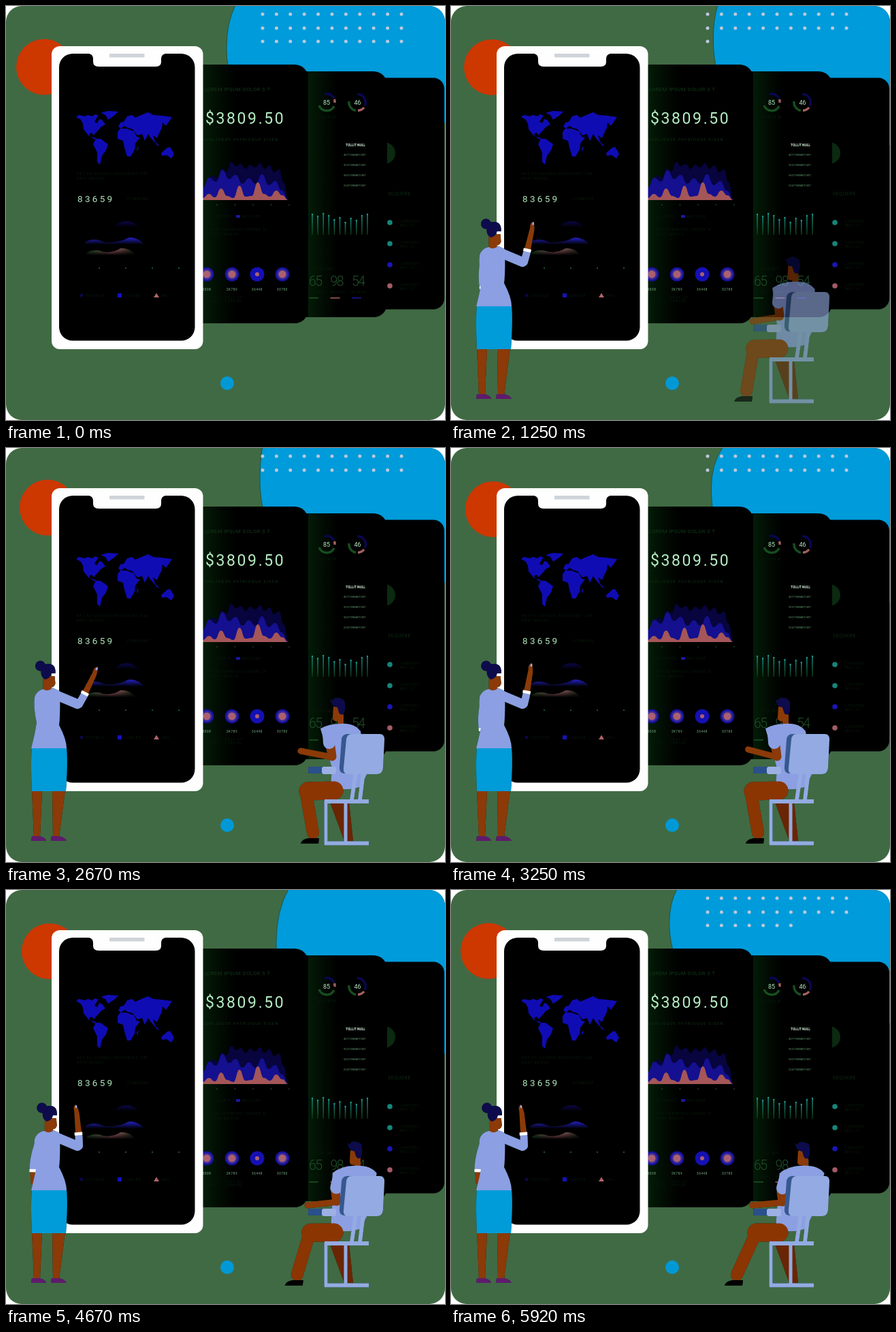
Write an HTML page that moves like this. It is 645 px wide and 608 px high and loops after 6.01 s.

```html
<!DOCTYPE html>
<html lang="en">
<head>
<meta charset="utf-8">
<title>Dashboard team</title>
<style>
  html, body { margin: 0; width: 100%; height: 100%; overflow: hidden; background: #fff; }
  svg { display: block; font-family: Roboto, "Open Sans", sans-serif; }
  .dim { fill: #081c0b; font-size: 5px; letter-spacing: 1px; }
  .map { fill: #100cb4; }
  .skin { fill: #8b3a08; }
  .skinLine { stroke: #8b3a08; }
  .cloth { fill: #8b9fe2; }
  .clothLine { stroke: #8b9fe2; }
  .hair { fill: #0d0b4c; }
  .limb { fill: none; stroke-linecap: round; stroke-linejoin: round; }
  .chair { fill: none; stroke: #93abe2; }
  #woman, #man { filter: drop-shadow(0 0 .6px #0a2a10); }
</style>
</head>
<body>
<svg width="645" height="608" viewBox="0 0 645 608">
  <defs>
    <clipPath id="stage"><rect width="645" height="608" rx="23"/></clipPath>
    <clipPath id="side"><rect x="560" y="106" width="84" height="340"/></clipPath>
    <linearGradient id="bar" x1="0" x2="0" y1="0" y2="1">
      <stop offset="0" stop-color="#178b80"/><stop offset="1" stop-color="#0b3414"/>
    </linearGradient>
    <linearGradient id="wave" x1="0" x2="0" y1="0" y2="1">
      <stop offset="0" stop-color="#2220c0"/><stop offset=".75" stop-color="#000"/>
    </linearGradient>
    <linearGradient id="arch" x1="0" x2="0" y1="0" y2="1">
      <stop offset="0" stop-color="#0a0748"/><stop offset="1" stop-color="#000"/>
    </linearGradient>
    <linearGradient id="wave2">
      <stop offset="0" stop-color="#1c5424"/><stop offset=".5" stop-color="#b06470"/><stop offset="1" stop-color="#0b2410"/>
    </linearGradient>
    <linearGradient id="fade" x1="0" x2="0" y1="0" y2="1">
      <stop offset="0" stop-color="#000" stop-opacity="0"/><stop offset="1" stop-color="#000"/>
    </linearGradient>
    <linearGradient id="shade">
      <stop offset="0" stop-color="#031c07"/><stop offset=".5" stop-color="#020c03"/><stop offset="1" stop-color="#000"/>
    </linearGradient>
  </defs>

  <g clip-path="url(#stage)">
    <rect width="645" height="608" fill="#406a44"/>
    <path id="blob" fill="#009bda" stroke="#1d4423" stroke-width=".7"/>
    <g id="dots" fill="#bcc8dc"></g>
    <circle id="sun" r="41" fill="#cd3700"/>

    <g id="panel4">
      <rect x="500" y="105.500" width="144" height="340" rx="16"/>
      <circle cx="556" cy="216" r="16" fill="#0b2a10" clip-path="url(#side)"/>
      <text x="561" y="278" fill="#0e2a12" font-size="7" letter-spacing=".6">SEQUERE</text>
    </g>

    <g id="panel3">
      <rect x="400" y="96" width="160" height="361" rx="20"/>
      <rect x="444" y="96" width="44" height="361" fill="url(#shade)"/>
      <g fill="none" stroke-width="3.500">
        <path d="M468 129.500A12 12 0 0 1 482 136" stroke="#0a0750"/>
        <path d="M482.500 137A12 12 0 0 1 483 142" stroke="#a4605f"/>
        <path d="M482 147A12 12 0 0 1 460 146" stroke="#174d1f"/>
        <path d="M516 129.500A12 12 0 0 1 527 147" stroke="#0a0750"/>
        <path d="M526 149A12 12 0 0 1 517 153.500" stroke="#a4605f"/>
        <path d="M514 153.500A12 12 0 0 1 504 140" stroke="#174d1f"/>
      </g>
      <g fill="#b9ebc4" font-size="9" text-anchor="middle">
        <text x="471" y="144.500">85</text><text x="516.500" y="144.500">46</text>
      </g>
      <text x="456" y="165" class="dim">ASSUM M</text>
      <text x="528" y="206" fill="#d9f5de" font-size="4.900" font-weight="700" text-anchor="end">TOLLIT NULL</text>
    </g>

    <g id="panel2">
      <rect x="240" y="86" width="204" height="380" rx="20"/>
      <rect x="289" y="86" width="48" height="380" fill="url(#shade)"/>
      <text x="291" y="125" fill="#123a18" font-size="7.500" letter-spacing=".5">LOREM IPSUM DOLOR S T</text>
      <text x="293" y="173" fill="#b5edc2" font-size="23" letter-spacing="2.600">$3809.50</text>
      <text x="289" y="198" fill="#123516" font-size="5.500" letter-spacing="1.450">QUALISQUE PATRIOQUE SISEN</text>
      <rect x="338" y="307" width="6" height="4" fill="#1a17a0"/>
      <text x="292" y="311" class="dim">ASSUEVERIT</text><text x="347" y="311" class="dim">MELIORE</text>
      <text x="289" y="330" class="dim">UT NAM COMMODO LABORE SI</text>
      <text x="289" y="337" class="dim">VIS ERAT MODUS</text>
    </g>

    <g id="phone">
      <rect x="67" y="59" width="222.500" height="445" rx="12" fill="#fdfefd"/>
      <rect x="78" y="70" width="199.500" height="421.500" rx="20"/>
      <path d="M122 70H234Q228 71 228 78V82Q228 89 220 89H136Q128 89 128 82V78Q128 71 122 70Z" fill="#fdfefd"/>
      <rect x="152" y="70" width="51.500" height="5.500" rx="1" fill="#cfd4da"/>
      <path class="map" d="M103 163L107 160 116 162 120 160 127 162 131 159 136 161 133 165 130 170 134 172 137 166 141 167 146 174 139 178 136 182 131 187 129 190 126 186 122 188 124 192 130 193 135 197 129 195 121 190 114 181 113 173 110 167Z"/>
      <path class="map" d="M139 157L150 154 165 155 159 161 150 167 146 160Z"/>
      <path class="map" d="M132 195L139 195 150 203 147 212 141 220 138 233 134 229 134 215 128 203Z"/>
      <path class="map" d="M164 185L168 180 177 180 188 184 192 192 197 193 190 202 189 211 183 221 178 221 174 208 172 198 164 195Z"/>
      <path class="map" d="M165 177L168 171 173 170 178 162 185 160 190 164 199 160 209 156 216 160 228 161 244 163 240 169 235 176 230 171 229 179 225 187 222 194 216 190 220 202 212 193 209 188 204 198 200 188 193 190 186 181 179 179 174 176 169 180Z"/>
      <path class="map" d="M228 216L237 208 241 207 247 217 243 224 236 219 229 220ZM219 199L226 206 221 204ZM192 209L195 206 193 214Z"/>
      <text x="104" y="248" class="dim">NEC EA QUANDO PRODESSET VIM</text>
      <text x="104" y="255" class="dim">ERAT MODUS</text>
      <text x="105" y="288" fill="#b0e6bb" font-size="13.500" letter-spacing="3.300">83659</text>
      <text x="178" y="285" class="dim">COMMUNE</text>
      <path d="M158 325Q166 316 177 316T196 325Z" fill="url(#arch)"/>
      <path d="M116 347Q128 339 145 347Q168 347 178 341Q190 337 205 351Q180 356 160 352Q138 356 116 351Z" fill="url(#wave)"/>
      <path d="M119 362Q130 356 143 361Q158 363 168 356Q180 354 191 366Q150 369 119 365Z" fill="url(#wave2)"/>
      <rect x="117" y="356" width="80" height="10" fill="url(#fade)"/>
      <rect x="117" y="366" width="80" height="4"/>
      <circle cx="111" cy="425" r="2.500" fill="#0a0748"/>
      <rect x="164" y="422" width="6" height="6" fill="#1411c0"/>
      <path d="M221 421.500L225 428H217Z" fill="#b06468"/>
      <text x="117" y="427" class="dim">VOCIBUS</text><text x="174" y="427" class="dim">LABORE</text><text x="229" y="427" class="dim">MEI</text>
    </g>
    <circle cx="325" cy="554" r="10" fill="#0099d6"/>

    <g id="woman">
      <g id="restArm" class="limb">
        <path d="M51 366Q42 385 41.500 408" class="clothLine" stroke-width="11"/>
        <path d="M41 417L42 429" class="skinLine" stroke-width="7"/>
        <path d="M36 412.500H47" stroke="#fff" stroke-width="4.500" stroke-linecap="butt"/>
      </g>
      <path class="skin" d="M38 502H53L50 572H41ZM68 502H87L78 572H69Z"/>
      <path fill="#5f1b6e" d="M38 570H49Q58 572 59 577H37ZM67 570H78Q87 572 89 577H66Z"/>
      <path fill="#009bd9" d="M38 440H89Q91 460 88 504H38Q36 460 38 440Z"/>
      <path class="cloth" d="M55 354Q45 356 42 366Q40 382 45 403Q43 418 37 441H89Q89 428 78 407Q80 390 79 357L68 352Z"/>
      <g id="head">
        <path class="skin" d="M55 335H72L73 346Q71 352 67 351V354Q60 358 55 354Z"/>
        <path class="hair" d="M52 326Q54 316 64 317Q74 318 73 331H67Q66 338 58 340Q51 336 52 326Z"/>
        <circle class="hair" cx="51" cy="320" r="7.500"/>
      </g>
      <path class="limb clothLine" d="M74 363L105 376" stroke-width="14"/>
      <g id="foreArm" class="limb">
        <path d="M107.500 376L108 362" class="clothLine" stroke-width="11"/>
        <path class="skin" d="M103.500 357L104 325Q102 317 107 315Q110 320 111 328L112.500 357Z"/>
        <path d="M102 358H113.500" stroke="#fff" stroke-width="4.500" stroke-linecap="butt"/>
        <path d="M107 317V319" stroke="#9cabe6" stroke-width="2.500"/>
      </g>
    </g>

    <g id="man">
      <path fill="#6a2604" d="M476 520H504L510 577H497Z"/>
      <g id="manHead">
        <path class="skin" d="M481 380H496V407Q490 411 487 404V401Q481 402 480 397Z"/>
        <path class="hair" d="M477 369Q481 373 482 368Q490 365 497 371Q500 382 496 391Q491 393 489 388L487 381Q479 381 477 369Z"/>
      </g>
      <path id="torso" class="cloth"/>
      <path id="shin" class="limb" stroke="#8b3503" stroke-width="18"/>
      <path id="thigh" class="limb" stroke="#8b3503" stroke-width="27"/>
      <path id="shoe" d="M433 581Q435 574 445 573H460L459 581Z"/>
      <rect x="444" y="468" width="22" height="10" rx="3" fill="#2a4f8a"/>
      <rect x="464" y="468" width="21" height="11" rx="3" fill="#9db0e4"/>
      <path id="upperArm" class="limb skinLine" stroke-width="13"/>
      <path id="lowerArm" class="limb skinLine" stroke-width="9"/>
      <path id="sleeve" class="limb clothLine" stroke-width="18"/>
      <path class="chair" stroke-width="6" d="M514 476L508 517M525 476L520 517M468 519H533M468 580.500H533"/>
      <path class="chair" stroke-width="5" d="M470 518V582M499 518V580"/>
      <path fill="#36588f" d="M502 420H515V478H497Q489 477 490 468L493 428Q494 420 502 420Z"/>
      <path fill="#93abe2" d="M508 420H549Q556 420 556 428L554 470Q553 479 545 479H503Q495 479 496 470L500 428Q501 420 508 420Z"/>
    </g>
  </g>
</svg>
<script>
const $ = id => document.getElementById(id);
const NS = 'http://www.w3.org/2000/svg';

function add(parent, tag, attrs, text = '') {
  const node = document.createElementNS(NS, tag);
  for (const k in attrs) node.setAttribute(k, attrs[k]);
  node.textContent = text;
  return $(parent).appendChild(node);
}
const dot = (parent, cx, cy, r, fill) => add(parent, 'circle', { cx, cy, r, fill });

// Dot grid
const rows = [12, 32.5, 52].map(y => {
  const row = [];
  for (let i = 0; i < 11; i++) row.push(dot('dots', 377 + 20.4 * i, y, 2.5, '#bcc8dc'));
  return row;
});

// Area chart: heights at even spacing, joined by smooth slopes
function ridge(heights, fill) {
  const x0 = 289, dx = 126 / (heights.length - 1);
  let d = `M${x0} 285V${285 - heights[0]}`;
  for (let i = 1; i < heights.length; i++) {
    const x = x0 + dx * i, m = x - dx / 2;
    d += `C${m} ${285 - heights[i - 1]} ${m} ${285 - heights[i]} ${x} ${285 - heights[i]}`;
  }
  add('panel2', 'path', { d: d + 'V285Z', fill });
}
ridge([14, 25, 36, 33, 46, 42, 56, 50, 53, 46, 52, 48, 54, 46, 51, 41, 45, 26, 0], '#07043e');
ridge([18, 33, 27, 44, 31, 37, 24, 32, 24, 38, 22, 28, 14, 0], '#14108f');
ridge([3, 9, 4, 17, 6, 3, 21, 5, 6, 26, 9, 5, 14, 7, 0], '#a45658');

// Small repeated items on the screens
['#17857a', '#17857a', '#1a15b4', '#a45c66'].forEach((c, i) => {
  const y = 318 + 31 * i;
  dot('panel4', 564, y, 3.8, c);
  add('panel4', 'text', { x: 579, y, class: 'dim' }, 'LABORES');
  add('panel4', 'text', { x: 579, y: y + 6, class: 'dim' }, 'MEL UT');
});

['4077598METOKT', '9537598METOKT', '9437598METOKT', '2347598METOKT'].forEach((s, i) => {
  const y = 220 + 15 * i;
  add('panel3', 'text', { x: 529, y, fill: '#5e9469', 'font-size': 4.2, 'text-anchor': 'end' }, s);
  add('panel3', 'text', { x: 445, y, class: 'dim' }, 'EA');
});

[305, 308, 304, 307, 313, 310, 317, 311, 314, 307, 305].forEach((y, i) => {
  const x = 450 + 8.1 * i;
  add('panel3', 'rect', { x: x - 0.8, y, width: 1.6, height: 336 - y, fill: 'url(#bar)' });
  dot('panel3', x, y + 1, 1.2, '#199a90');
});

[['65', '#1c5424'], ['98', '#a4605f'], ['54', '#1a17a0']].forEach(([n, c], i) => {
  const x = 445 + 31.5 * i;
  add('panel3', 'text', { x, y: 411, fill: '#204f29', 'font-size': 19.5, 'font-weight': 300, 'letter-spacing': -1.6 }, n);
  add('panel3', 'text', { x, y: 422, class: 'dim' }, 'MODUS');
  add('panel3', 'rect', { x, y: 428, width: 14, height: 1.5, fill: c });
});
add('panel3', 'text', { x: 445, y: 388, class: 'dim' }, 'CETERO MEI');

['0008', '2K789', '36448', '30780'].forEach((s, i) => {
  const x = 295 + 37 * i;
  const solid = i === 2;
  dot('panel2', x, 394, 10.5, solid ? '#1510b4' : '#18109a');
  if (!solid) dot('panel2', x, 394, 8, '#3a2c9c');
  dot('panel2', x, 394, solid ? 3 : 5.5, '#aa6070');
  add('panel2', 'text', { x, y: 418, fill: '#7fb58a', 'font-size': 4.6, 'letter-spacing': 0.6, 'text-anchor': 'middle' }, s);
  if (i < 2) {
    add('panel2', 'text', { x: x - 10, y: 430, class: 'dim' }, 'ERAT UT');
    add('panel2', 'text', { x: x - 10, y: 435, class: 'dim' }, 'LABORE');
  }
});
for (let i = 0; i < 5; i++) dot('panel2', 310 + 26.5 * i, 292, 0.8, '#2a6a36');
for (let i = 0; i < 4; i++) dot('phone', 137 + 39 * i, 385, 1, '#2a6a4a');

// Motion tables: [time, ...values]
const LOOP = 6010, STEPS = 72;
const blobKeys = [ // top x, left x, left y, right y
  [0, 337, 324, 62, 171], [670, 388, 382, 48, 207], [1750, 395, 388, 48, 203], [2670, 377, 373, 46, 197],
  [3750, 427, 394, 76, 265], [4670, 415, 397, 78, 240], [5920, 331, 320, 48, 195], [6010, 337, 324, 62, 171]];
const sunKeys = [
  [0, 56, 89.5], [670, 62, 88], [1330, 60, 90], [1750, 62, 87], [2050, 56, 88], [2670, 61, 87.5],
  [3750, 63, 93], [4670, 64, 90], [5920, 55, 89.5], [6010, 56, 89.5]];
const womanFade = [[0, 0], [330, 0], [670, 0.42], [1000, 1]];
const manFade = [[0, 0], [420, 0], [670, 0.22], [1750, 0.92], [2000, 1]];
const reachKeys = [[0, 0], [900, 0], [1600, 1], [2750, 1], [3500, 0], [3850, 0], [4500, -0.15]];
const restKeys = [[0, 0], [3750, 0], [4500, 2]];
const leanKeys = [[0, 1], [900, 1], [1600, 0], [3850, 0], [4670, 0.86], [5330, 1]];
const legKeys = [[0, 1], [900, 1], [1650, 0], [3850, 0], [4670, 0.75], [5330, 1]];
const handKeys = [ // hand x, hand y
  [0, 443, 463], [1750, 443, 463], [2670, 433, 445], [3750, 441, 440], [4500, 443, 463]];

function sample(keys, t) {
  const i = keys.findIndex(k => k[0] > t);
  if (i < 0) return keys[keys.length - 1].slice(1);
  const a = keys[i - 1], b = keys[i];
  const u = (t - a[0]) / (b[0] - a[0]);
  const e = u * u * (3 - 2 * u);
  return a.slice(1).map((v, k) => v + (b[k + 1] - v) * e);
}
const set = (id, name, value) => $(id).setAttribute(name, value);

function drawBack(t) {
  const [top, left, y, right] = sample(blobKeys, t);
  set('blob', 'd', `M${top} -1Q${left} ${y * 0.4} ${left} ${y}C${left} ${y + 150} 520 ${right + 50} 647 ${right}V-1Z`);
  const [cx, cy] = sample(sunKeys, t);
  set('sun', 'cx', cx);
  set('sun', 'cy', cy);
  const mid = t > 4250 && t < 5300;
  const late = t > 5300;
  rows.forEach((row, r) => row.forEach((c, i) => {
    const on = r < 2 ? !mid
      : t < 330 || (late && i < 7) || (i === 0 && left > 384 && !mid);
    c.style.display = on ? '' : 'none';
  }));
}

function drawWoman(t) {
  set('woman', 'opacity', sample(womanFade, t)[0]);
  const [p] = sample(reachKeys, t);
  const [rest] = sample(restKeys, t);
  set('foreArm', 'transform', `rotate(${27 * p} 107 376)`);
  set('restArm', 'transform', `rotate(${rest - 14 * Math.max(p, 0)} 51 366)`);
  set('head', 'transform', `translate(${1.5 - 2 * p} 0)`);
}

function drawMan(t) {
  set('man', 'opacity', sample(manFade, t)[0]);
  const [lean] = sample(leanKeys, t);
  const [leg] = sample(legKeys, t);
  const [hx, hy] = sample(handKeys, t);
  const s = 23 * lean;
  set('manHead', 'transform', `translate(${29 * lean} ${3 * lean})`);
  set('torso', 'd', `M${462 + s * 0.9} ${412 + 4 * lean}Q${475 + s} 405 ${490 + s} 405Q${511 + s * 1.2} 403 ${521 + s * 1.2} 416`
    + `L530 480 520 498Q495 505 477 497L479 470Z`);
  const ex = 477 + 8 * lean, ey = 453 + 5 * lean;
  set('sleeve', 'd', `M${474 + 18 * lean} ${418 + 2 * lean}L${ex - 2 + 4 * lean} ${433 + 5 * lean}`);
  set('upperArm', 'd', `M${ex} ${438 + 5 * lean}L${ex + 2} ${ey}`);
  set('lowerArm', 'd', `M${ex + 2} ${ey + 1}L${hx} ${hy}`);
  const foot = -31 * leg;
  set('thigh', 'd', `M482 503L${444 + 5 * leg} ${504 - leg}`);
  set('shin', 'd', `M${441 + 5 * leg} 508L${451 + foot} 565`);
  set('shoe', 'transform', `translate(${foot} 0)`);
}

function tick(now) {
  const step = LOOP / STEPS;
  const t = Math.floor((now % LOOP + 4) / step) * step % LOOP;
  drawBack(t);
  drawWoman(t);
  drawMan(t);
  requestAnimationFrame(tick);
}
tick(0);
</script>
</body>
</html>
```
